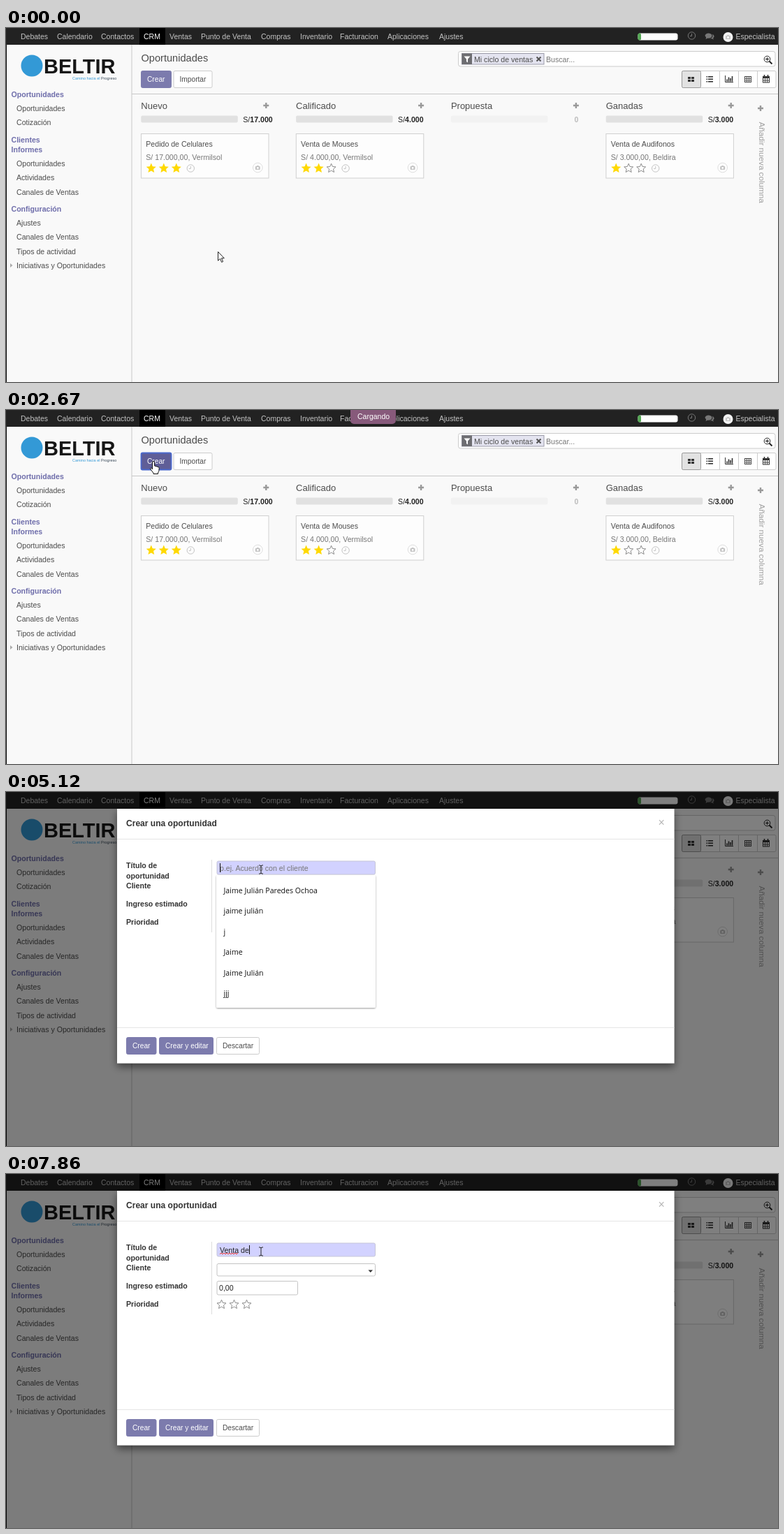
These frames come from a looping animation (1105 px wide and 507 px high, 8 s). An HTML page:

```html
<!DOCTYPE html>
<html lang="es">
<head>
<meta charset="utf-8">
<title>Oportunidades</title>
<style>
html, body { margin: 0; width: 100%; height: 100%; overflow: hidden; background: #f9f9f9; }
svg { display: block; font: 10.6px "Liberation Sans", Arial, sans-serif; }
text { fill: #4c4c4c; white-space: pre; }
.b { font-weight: bold; }
.menu { fill: #c4c4c4; font-size: 10.5px; }
.white { fill: #fff; font-size: 10.5px; }
.head { fill: #6f6eab; font-weight: bold; }
.title { font-size: 14.6px; }
.col { font-size: 13px; }
.btn { font-size: 10.2px; }
.btn.light { fill: #fff; }
.dim { fill: #777; }
.pale { fill: #bbb; font-weight: bold; }
.add { font-size: 11.7px; fill: #a0a0a0; }
.label { font-weight: bold; fill: #333; }
.big { font-size: 12.06px; font-weight: bold; fill: #333; }
.dark { fill: #222; }
.hint { font: 10.6px "Open Sans", "Noto Sans", sans-serif; fill: #111; }
.brand { font-size: 29px; font-weight: bold; fill: #161616; }
.motto { font-size: 5.5px; fill: #3a4a5a; }
.x { font-size: 16px; fill: #b5b5b5; }
</style>
</head>
<body>
<svg id="stage" width="1105" height="507" viewBox="0 0 1105 507">
  <defs>
    <filter id="deep" x="-10%" y="-10%" width="120%" height="125%">
      <feDropShadow dx="0" dy="5" stdDeviation="6" flood-opacity=".5"/>
    </filter>
    <filter id="soft" x="-5%" y="-5%" width="110%" height="112%">
      <feDropShadow dx="0" dy="1" stdDeviation="1.3" flood-opacity=".4"/>
    </filter>
  </defs>
  <g id="page"></g>
  <g id="loading">
    <path d="M493 0H558V15a5 5 0 0 1-5 5H498a5 5 0 0 1-5-5Z" fill="#875a7b"/>
    <text class="white" x="503" y="13">Cargando</text>
  </g>
  <g id="modal"></g>
  <path id="arrow" d="M.5 .5V13.2L3.5 10.4 5.6 15.4 7.6 14.6 5.5 9.7H9.3Z" fill="#fff" stroke="#222"/>
  <path id="hand" d="M3.6 2a1.5 1.5 0 0 1 3 0V7l5.3 1.5q1.4.5 1.3 2l-.4 4-1.3 2.5V18.5H5V17.2L1 12q-.9-1.4.3-1.9 1-.2 2.3 1.6Z" fill="#fff" stroke="#111"/>
  <path id="beam" d="M-3-6H-1L0-5 1-6H3M0-5V5M-3 6H-1L0 5 1 6H3" fill="none" stroke="#222"/>
</svg>
<script>
const $ = id => document.getElementById(id);
const text = (x, y, str, cls = '', extra = '') => `<text x="${x}" y="${y}" class="${cls}" ${extra}>${str}</text>`;
const rect = (x, y, w, h, fill, stroke = 'none', r = 0, extra = '') =>
  `<rect x="${x}" y="${y}" width="${w}" height="${h}" rx="${r}" fill="${fill}" stroke="${stroke}" ${extra}/>`;
const path = (d, fill, stroke = 'none', width = 1) =>
  `<path d="${d}" fill="${fill}" stroke="${stroke}" stroke-width="${width}"/>`;
const circle = (x, y, r, fill, stroke = 'none') =>
  `<circle cx="${x}" cy="${y}" r="${r}" fill="${fill}" stroke="${stroke}"/>`;
const plus = (x, y) => path(`M${x - 4} ${y}H${x + 4}M${x} ${y - 4}V${y + 4}`, 'none', '#999', 2.4);
const clock = (x, y, color) => circle(x, y, 5.2, 'none', color) + path(`M${x} ${y - 3}V${y + .5}H${x - 2.5}`, 'none', color);
const camera = (x, y, color) => rect(x - 3.5, y - 2, 7, 5, color, 'none', 1) + rect(x - 1.5, y - 3, 3, 2, color) + circle(x, y + .5, 1.4, '#fff');

function star(x, y, full) {
  let d = '';
  for (let i = 0; i < 10; i++) {
    const size = full ? 7.4 : 6.8, r = i % 2 ? size * .46 : size, a = i * Math.PI / 5;
    d += `${i ? 'L' : 'M'}${(x + r * Math.sin(a)).toFixed(2)} ${(y - r * Math.cos(a)).toFixed(2)}`;
  }
  return full ? path(d + 'Z', '#ffd900') : path(d + 'Z', 'none', '#8c8c8c');
}
const stars = (x, y, count) => [0, 1, 2].map(i => star(x + i * 18, y, i < count)).join('');

function column(i, name, amount, deal, price, rank) {
  const x = 193.3 + i * 221.8;
  let out = text(x, 116, name, 'col') + plus(x + 179, 111) +
    rect(x, 125.5, 138.5, 10, deal ? '#e1e1e1' : '#f2f2f2', 'none', 2);
  if (!deal) return out + text(x + 182.4, 134.5, amount, 'pale', 'text-anchor="end"');
  out += text(x + 146, 134.5, `S/<tspan class="b">${amount}</tspan>`, 'dark');
  return out + rect(x + .2, 151.5, 182.5, 63.5, '#fdfdfd', '#d0d0d0') +
    text(x + 7, 170, deal) + text(x + 7, 188.5, price, 'dim') + stars(x + 14.5, 201, rank) +
    clock(x + 71, 201, '#c4c4c4') + circle(x + 167, 200, 6.8, '#fff', '#ddd') + camera(x + 167, 200, '#c4c4c4');
}

function topBar() {
  const items = [[21, 'Debates'], [73, 'Calendario'], [136, 'Contactos'], [197, 'CRM'], [234, 'Ventas'],
    [279, 'Punto de Venta'], [365, 'Compras'], [421, 'Inventario'], [478, 'Facturacion'],
    [546, 'Aplicaciones'], [620, 'Ajustes']];
  return rect(0, 0, 1105, 24, '#222') + rect(191, 0, 37, 24, '#000') +
    items.map(([x, s]) => text(x, 16, s, s == 'CRM' ? 'white' : 'menu')).join('') +
    rect(904.5, 7.5, 57, 10, '#fff', 'none', 3) + rect(904.5, 7.5, 4.5, 10, '#55a855', 'none', 2) +
    clock(981.5, 11, '#777') +
    path('M1000.500 11a5 3.600 0 1 1 4 3.600l-3 1.400 .7-2.200ZM1007 15.300a5.500 4 0 0 0 3.500-6.300 3.500 3 0 0 1 1.500 5.500l1 2-3-1.200Z', '#777') +
    circle(1033.5, 13, 7, '#f4f4f4') + camera(1033.5, 13, '#c8c8c8') + text(1044.5, 16, 'Especialista', 'menu');
}

function sidebar() {
  const heads = [[99, 'Oportunidades'], [163.5, 'Clientes'], [178, 'Informes'], [263, 'Configuración']];
  const links = [[118.5, 'Oportunidades'], [139, 'Cotización'], [198, 'Oportunidades'], [218, 'Actividades'],
    [238.5, 'Canales de Ventas'], [283, 'Ajustes'], [303, 'Canales de Ventas'], [323.5, 'Tipos de actividad'],
    [344, 'Iniciativas y Oportunidades']];
  return circle(37, 54, 15.5, '#3399d6') + text(54, 64.5, 'BELTIR', 'brand') +
    text(95, 74, '<tspan fill="#3399d6">Camino hacia el</tspan> Progreso', 'motto') +
    heads.map(([y, s]) => text(7.5, y, s, 'head')).join('') +
    links.map(([y, s]) => text(15, y, s)).join('') +
    path('M6 337l3.500 3-3.500 3Z', '#aaa') + rect(179.5, 24, 1, 483, '#c8c8c8') + rect(0, 0, 1, 507, '#000');
}

function viewIcons() {
  const bars = (x, y, h) => rect(x, y - h, 1.6, h, '#333');
  let out = rect(967.5, 61.5, 134.5, 24, '#fff', '#ccc', 2) + rect(967.5, 61.5, 27, 24, '#e2e2e2', '#999', 2);
  for (const x of [1021.5, 1048.5, 1075.5]) out += rect(x - .5, 62, 1, 23, '#ccc');
  for (let i = 0; i < 4; i++) out += rect(976 + i % 2 * 5, 70 + (i >> 1) * 4, 4, 3, '#333');
  for (let i = 0; i < 3; i++) out += rect(1002.5, 69 + i * 3.5, 1.6, 1.6, '#333') + rect(1005, 69 + i * 3.5, 7, 1.6, '#333');
  out += path('M1029.500 68V77.500H1041', 'none', '#333') + bars(1031.2, 76.5, 3) + bars(1033.7, 76.5, 6) + bars(1036.2, 76.5, 4.5) + bars(1038.7, 76.5, 7.5);
  out += rect(1057.5, 69.5, 9, 8, 'none', '#444') + path('M1057.500 72.300H1066.500M1057.500 75H1066.500M1060.500 69.500V77.500M1063.500 69.500V77.500', 'none', '#444', .9);
  return out + rect(1083.5, 69.5, 9, 8.5, '#fff', '#333') + rect(1083, 69, 10, 3, '#333') + path('M1085.500 67V70M1090.500 67V70', 'none', '#333', 1.6) +
    path('M1084 75H1092M1086.500 72V78M1089.500 72V78', 'none', '#333', .9);
}

function controls() {
  return text(193.5, 48, 'Oportunidades', 'title') +
    rect(193.5, 61.5, 43, 24, '#7c7bad', '#7c7bad', 2, 'id="create"') + text(202, 77, 'Crear', 'btn light') +
    rect(240, 61.5, 55, 24, '#fff', '#ccc', 2, 'id="import"') + text(248.5, 77, 'Importar', 'btn') +
    rect(647.5, 33.5, 453.5, 21.5, '#fff', '#ccc', 3) + rect(652.5, 36.5, 117.5, 15.5, '#e4e4f0', '#9a9aa8') +
    rect(652.5, 36.5, 14.5, 15.5, '#6e6e72') + path('M655.500 40.500H664.500L661 44.500V49.500L659 48V44.500Z', '#fff') +
    text(670, 48.5, 'Mi ciclo de ventas') + path('M759.500 41.500l6 6m0-6l-6 6', 'none', '#555', 2) +
    text(773, 48.5, 'Buscar...', 'dim') + circle(1089.5, 44.5, 4.3, 'none', '#222') +
    path('M1087 44.500H1092M1089.500 42V47', 'none', '#222') + path('M1092.500 47.500L1096.500 51.500', 'none', '#222', 2) +
    viewIcons() + rect(180, 94, 925, 1, '#c8c8c8');
}

$('page').innerHTML = rect(0, 0, 1105, 507, '#f9f9f9') + sidebar() + topBar() + controls() +
  column(0, 'Nuevo', '17.000', 'Pedido de Celulares', 'S/ 17.000,00, Vermilsol', 3) +
  column(1, 'Calificado', '4.000', 'Venta de Mouses', 'S/ 4.000,00, Vermilsol', 2) +
  column(2, 'Propuesta', '0') +
  column(3, 'Ganadas', '3.000', 'Venta de Audifonos', 'S/ 3.000,00, Beldira', 1) +
  plus(1080, 115) + text(0, 0, 'Añadir nueva columna', 'add', 'transform="translate(1077.500 134.500) rotate(90)"');

const labels = [[108.5, 'Título de'], [123.5, 'oportunidad'], [138, 'Cliente'], [163.5, 'Ingreso estimado'], [190, 'Prioridad']];
const hints = ['Jaime Julián Paredes Ochoa', 'jaime julián', 'j', 'Jaime', 'Jaime Julián', 'jjj'];
let squiggle = 'M306 115';
for (let i = 0; i < 13; i++) squiggle += `l2 ${i % 2 ? 2 : -2}`;

$('modal').innerHTML = rect(0, 0, 1105, 507, '#000', 'none', 0, 'opacity=".5"') +
  rect(159, 24, 797.5, 364.5, '#fff', 'none', 0, 'filter="url(#deep)"') +
  text(172, 49, 'Crear una oportunidad', 'big') + text(933.5, 48.5, '×', 'x') +
  rect(159, 67, 797.5, 1, '#e5e5e5') + rect(159, 337, 797.5, 1, '#e5e5e5') +
  labels.map(([y, s]) => text(172, y, s, 'label')).join('') + rect(294, 97, 1, 104, '#ddd') +
  rect(302, 99, 226.5, 19, '#d2d2ff', '#c6c6d8', 2) +
  rect(302, 128.5, 226.5, 17.5, '#fff', '#c4c4c4', 2) + path('M518.500 137.500H525L521.750 141Z', '#333') +
  rect(302, 153.5, 115.5, 19.5, '#fff', '#c4c4c4', 2) + text(305, 167, '0,00', 'dark') + stars(308.5, 187, 0) +
  rect(172.5, 351.5, 42.5, 24, '#7c7bad', '#7c7bad', 2) + text(181, 367, 'Crear', 'btn light') +
  rect(219.5, 351.5, 77, 24, '#7c7bad', '#7c7bad', 2) + text(228, 367, 'Crear y editar', 'btn light') +
  rect(301.5, 351.5, 61, 24, '#fff', '#ccc', 2) + text(310, 367, 'Descartar', 'btn') +
  `<g id="hints">${rect(301, 119, 228, 190, '#fff', 'none', 2, 'filter="url(#soft)"')}` +
  hints.map((s, i) => text(311.5, 145 + i * 29.4, s, 'hint')).join('') + '</g>' +
  text(306, 113, 'p.ej. Acuerdo con el cliente', 'dim', 'id="placeholder"') +
  text(306, 113, '', 'dark', 'id="typed"') +
  `<path id="squiggle" d="${squiggle}" fill="none" stroke="#e33"/>` + rect(306, 102, 1, 13, '#111', 'none', 0, 'id="caret"');

// Each track is a list of [start, value]; a value holds until the next start.
const at = (track, t) => track.reduce((v, [start, value]) => t >= start ? value : v, track[0][1]);
const pointer = [
  [0, [303, 320]], [1160, [301, 303]], [1300, [296, 252]], [1450, [286, 178]], [1590, [273, 114]],
  [1740, [251, 80]], [1890, [227, 76]], [2020, [216, 75]], [2170, [211, 74]], [3900, [210, 73]],
  [4050, [222, 77]], [4190, [258, 90]], [4330, [311, 106]], [4480, [350, 111]], [4620, [365, 111]]];
const shape = [[0, 'arrow'], [1740, 'hand'], [3900, 'arrow'], [4330, 'beam']];
const loading = [[0, 0], [2670, 1], [2810, .7], [2950, .3], [3090, 0], [3470, 1], [3900, .55], [4050, .2], [4190, 0]];
const typed = [[0, ''], [6450, 'V'], [6580, 'Ve'], [6730, 'Ven'], [6870, 'Vent'], [7020, 'Venta'], [7300, 'Venta '], [7720, 'Venta d'], [7860, 'Venta de']];
const caret = [[0, 1], [4370, 0], [4870, 1], [5410, 0], [5920, 1]];
const show = (id, on) => $(id).style.display = on ? '' : 'none';
const paint = (id, fill, stroke, width = 1) => {
  for (const [k, v] of Object.entries({ fill, stroke, 'stroke-width': width })) $(id).setAttribute(k, v);
};

function draw(t) {
  const [x, y] = at(pointer, t), kind = at(shape, t), word = at(typed, t);
  for (const id of ['arrow', 'hand', 'beam']) show(id, id == kind);
  $(kind).setAttribute('transform', kind == 'hand' ? `translate(${x - 5} ${y - 1})` : `translate(${x} ${y})`);

  if (t >= 2670) paint('create', '#5f5e97', '#4a68cc', 1.8);
  else if (t >= 2020) paint('create', '#5f5e97', '#5f5e97');
  else paint('create', '#7c7bad', '#7c7bad');
  if (t >= 1740 && t < 2020) paint('import', '#e6e6e6', '#adadad');
  else paint('import', '#fff', '#ccc');

  $('loading').style.opacity = at(loading, t);
  show('modal', t >= 3900);
  show('hints', t >= 5120 && t < 6580);
  show('placeholder', !word);
  show('squiggle', t >= 7440);
  show('caret', at(caret, t));
  if ($('typed').textContent != word) $('typed').textContent = word;
  $('caret').setAttribute('x', word ? Math.round(306 + $('typed').getComputedTextLength()) : 306);
}

function frame() {
  draw(performance.now() % 8000);
  requestAnimationFrame(frame);
}
frame();
</script>
</body>
</html>
```
